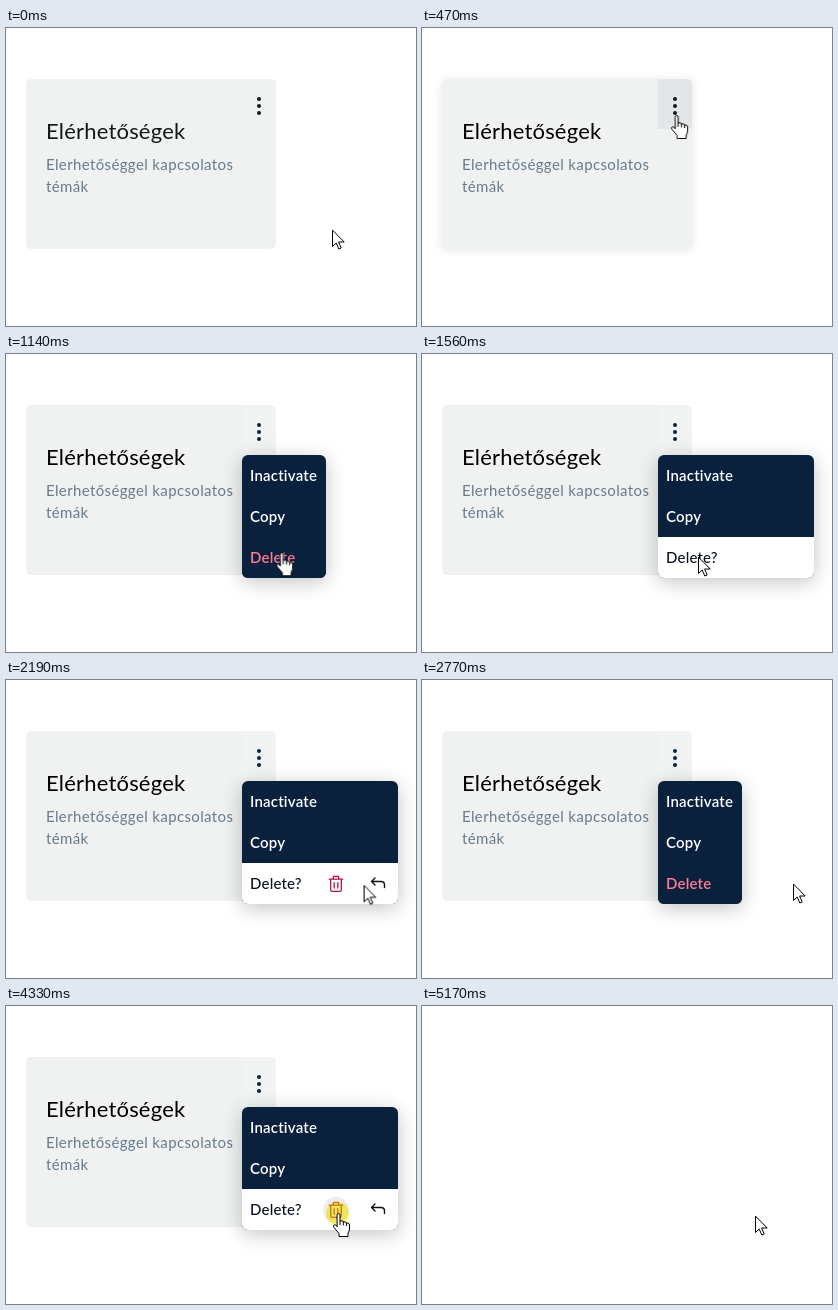
An HTML page for the animation above (5710 ms loop, 410x298 px).

```html
<!DOCTYPE html>
<html lang="hu">
<head>
<meta charset="utf-8">
<title>Card menu</title>
<style>
  html, body { margin: 0; width: 100%; height: 100%; overflow: hidden; background: #fff; }
  body { position: relative; font: 400 15px Lato, sans-serif; }
  div, svg { position: absolute; }
  svg { overflow: visible; fill: none; stroke-linecap: round; stroke-linejoin: round; }

  #card { left: 20px; top: 51px; width: 250px; height: 170px; border-radius: 5px; background: #f0f2f2; }
  #title { left: 20px; top: 39px; font-size: 22px; line-height: 26px; letter-spacing: .2px; color: #15181b; }
  #desc { left: 20px; top: 74px; line-height: 22px; letter-spacing: .37px; color: #687a8c; white-space: nowrap; }
  #more { left: 216px; top: 0; width: 34px; height: 50px; border-radius: 0 5px 0 0; }
  #dots { left: 0; top: 0; }

  #menu { left: 236px; top: 101px; width: 84px; height: 123px; border-radius: 6px; overflow: hidden;
          background: #0a213e; box-shadow: 0 4px 20px rgba(0, 0, 0, .24); }
  .row { left: 0; width: 100%; height: 41px; line-height: 41px; font-weight: 600; letter-spacing: .2px;
         color: #fff; white-space: nowrap; }
  .row span { position: absolute; left: 8px; }
  #del { color: #ff7b95; }
  #ask { color: #0a1220; font-weight: 500; }
  .spot { width: 26px; height: 26px; top: 8px; border-radius: 50%; background: #eeeeee; opacity: 0; }
  #tools { left: 0; top: 0; }

  #track { left: 0; top: 0; mix-blend-mode: multiply; }
  #glow { left: -11.5px; top: -11.5px; width: 23px; height: 23px; border-radius: 50%; background: #fdf56a; }
  #cursor { left: 0; top: 0; }
  #cursor svg { left: 0; top: 0; fill: #fff; stroke: #000; }
  #cursor #hand { left: 1.5px; }
</style>
</head>
<body>
<div id="card">
  <div id="more"></div>
  <div id="content">
    <div id="title">Elérhetőségek</div>
    <div id="desc">Elerhetőséggel kapcsolatos<br>témák</div>
    <svg id="dots" width="1" height="1">
      <circle cx="233" cy="20" r="2"/><circle cx="233" cy="27" r="2"/><circle cx="233" cy="34" r="2"/>
    </svg>
  </div>
  <svg id="bin" width="1" height="1" stroke="#b3173f" stroke-width="1.2" style="left:125px;top:85px">
    <use href="#trash" transform="scale(2.4)"/>
  </svg>
</div>

<div id="menu">
  <div class="row" style="top:0"><span>Inactivate</span></div>
  <div class="row" style="top:41px"><span>Copy</span></div>
  <div class="row" id="last" style="top:82px">
    <span id="del">Delete</span><span id="ask">Delete?</span>
    <div id="tools">
      <div class="spot" id="spotBin" style="left:81px"></div>
      <div class="spot" id="spotUndo" style="left:123px"></div>
      <svg id="small" width="1" height="1" stroke-width="1.3" style="left:94px;top:21px">
        <g id="trash"><path d="M-6.8-4.8H6.8M-5.3-4.8V5.8Q-5.3 7.4-3.8 7.4H3.8Q5.3 7.4 5.3 5.8V-4.8M-2.6-4.8V-7.6H2.6V-4.8M-1.8-1.4V4M1.8-1.4V4"/></g>
      </svg>
      <svg width="1" height="1" stroke="#111" stroke-width="1.4" style="left:135.5px;top:20px">
        <path d="M-3-5L-6.5-1.5-3 2M-6.5-1.5H3Q6.5-1.5 6.5 2V4.5"/>
      </svg>
    </div>
  </div>
</div>

<div id="track"><div id="glow"></div></div>
<div id="cursor">
  <svg id="arrow" width="1" height="1">
    <path d="M.5.5V16.5L4.2 13 6.8 19 9.2 18 6.6 12H11.8Z"/>
  </svg>
  <svg id="hand" width="1" height="1">
    <path d="M-2 2Q-2 .5-.5 .5T1 2V8Q4 7 4.3 9 7 8.2 7.4 10 10.5 9.6 10.5 12V16Q10.5 18 9 20V23.5H0V20.5L-5 14.5Q-6.3 12.5-4.8 11.8T-2 13.5Z"/>
    <path d="M1 8v3.5M4.3 9v3M7.4 10v2.6"/>
  </svg>
</div>

<script>
const LOOP = 5710;
const $ = id => document.getElementById(id);

// Rows are [ms, value, easing to the next row]; without easing the value is held.
function play(id, prop, rows) {
  const frames = rows.map(([ms, value, easing = 'step-end']) =>
    ({ offset: ms / LOOP, [prop]: value, easing }));
  frames.push({ offset: 1, [prop]: rows.at(-1)[1] });
  $(id).animate(frames, { duration: LOOP, iterations: Infinity });
}

// Shows a part only within the given [from, to] spans.
const show = (id, spans) => play(id, 'opacity',
  [[0, 0], ...spans.flatMap(([from, to]) => [[from, 1], [to, 0]])]);

const at = (ms, x, y, easing) => [ms, `translate(${x}px, ${y}px)`, easing];

const path = [
  at(0, 326, 202), at(60, 326, 202, 'ease-in-out'),
  at(540, 250, 82), at(800, 250, 82, 'ease-in-out'),
  at(1190, 275, 202), at(1300, 275, 202, 'linear'),
  at(1560, 276, 203, 'ease-in'), at(1780, 288, 212, 'ease-in-out'),
  at(2350, 371, 204), at(2790, 371, 204, 'ease-in'),
  at(3000, 325, 222, 'ease-out'), at(3220, 280, 206), at(3450, 280, 206, 'linear'),
  at(3600, 283, 208, 'ease-in'), at(3800, 309, 222, 'ease-out'),
  at(4130, 331, 207), at(4830, 331, 207, 'ease-in-out'), at(5170, 333, 210)
];
play('cursor', 'transform', path);
play('track', 'transform', path);

const hands = [[450, 1280], [1990, 2110], [2220, 2690], [3140, 3290], [3950, 4400]];
show('hand', hands);
play('arrow', 'opacity', [[0, 1], ...hands.flatMap(([from, to]) => [[from, 0], [to, 1]])]);
show('glow', [[640, 700], [1220, 1280], [2650, 2690], [3240, 3300], [4330, 4390]]);

// Card
play('card', 'boxShadow', [
  [0, '0 1px 10px rgba(0,0,0,0)'], [390, '0 1px 10px rgba(0,0,0,0)', 'linear'],
  [500, '0 1px 10px rgba(0,0,0,.15)'], [880, '0 1px 10px rgba(0,0,0,.15)', 'linear'],
  [1000, '0 1px 10px rgba(0,0,0,0)']
]);
play('card', 'opacity', [[0, 1], [4830, 1, 'linear'], [5150, 0]]);
play('title', 'color', [[0, '#15181b'], [400, '#000']]);
play('dots', 'fill', [[0, '#111820'], [980, '#0a213e']]);
play('more', 'backgroundColor', [
  [0, '#f0f2f2'], [440, '#f0f2f2', 'linear'], [520, '#cdd3d7'],
  [880, '#cdd3d7', 'linear'], [980, '#f2f4f4'], [4390, '#f0f2f2']
]);
play('content', 'opacity', [[0, 1], [4390, 1, 'linear'], [4530, 0]]);
play('bin', 'opacity', [[0, 0], [4390, 0, 'linear'], [4530, 1]]);

// Menu
play('menu', 'opacity', [
  [0, 0], [675, 0, 'linear'], [840, 1], [4390, 1, 'linear'], [4530, 0]
]);
const narrow = '84px', wide = '156px';
play('menu', 'width', [
  [0, narrow], [1240, narrow, 'ease-out'], [1460, wide], [2690, narrow],
  [3260, narrow, 'ease-out'], [3480, wide]
]);
const navy = '#0a213e', white = '#fff';
play('last', 'backgroundColor', [
  [0, navy], [1240, navy, 'linear'], [1440, white], [2690, navy],
  [3260, navy, 'linear'], [3460, white]
]);
play('del', 'opacity', [[0, 1], [1260, 0], [2690, 1], [3280, 0]]);
show('ask', [[1260, 2690], [3280, LOOP - 10]]);
show('tools', [[1575, 2690], [3590, LOOP - 10]]);
show('spotBin', [[1990, 2110], [3950, 4530]]);
show('spotUndo', [[2220, 2690]]);
play('small', 'stroke', [[0, '#b3173f'], [4330, '#d0781c']]);
</script>
</body>
</html>
```
